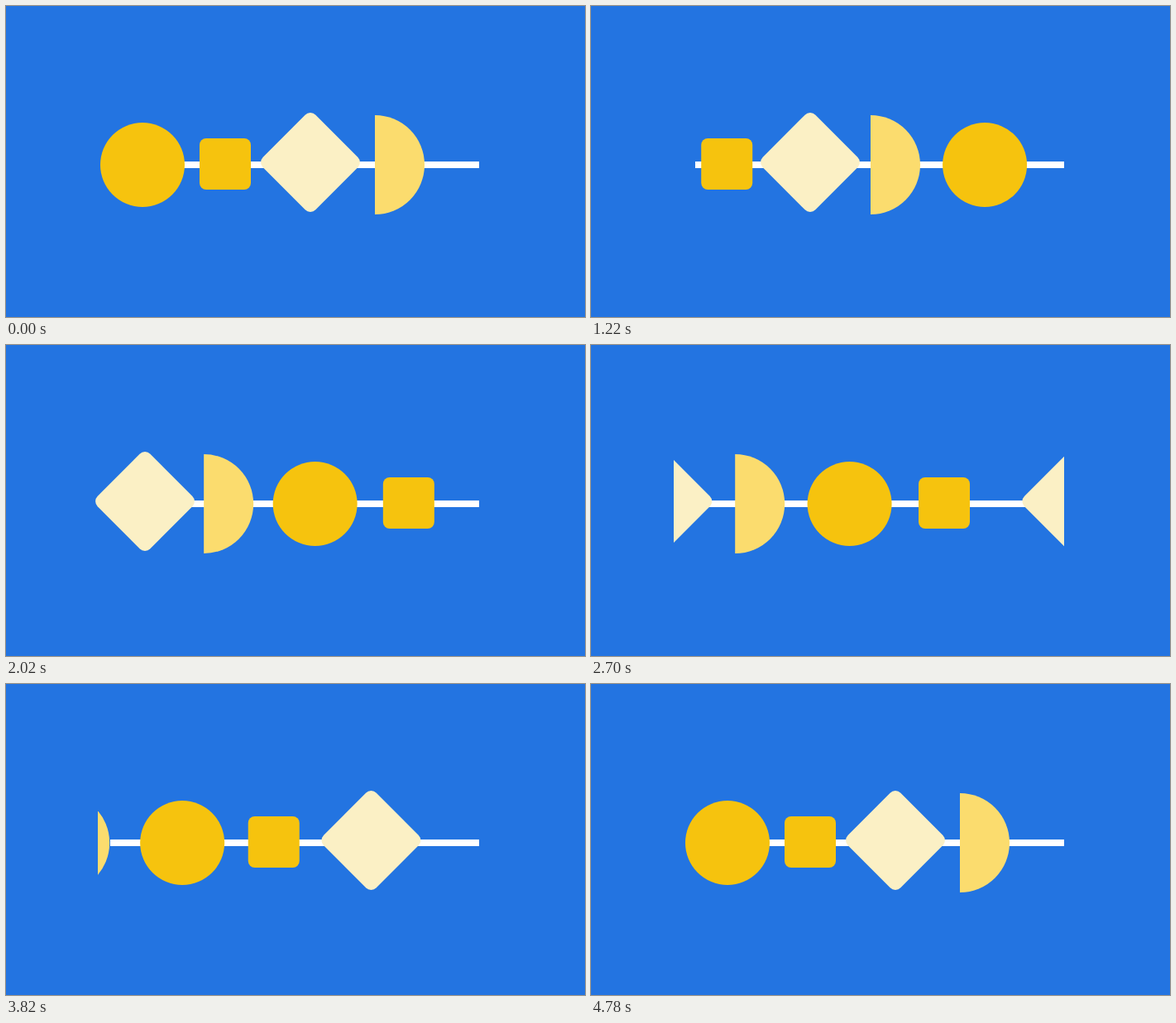
These frames come from a looping animation (700x376 px, 4.8 s). An HTML page:

```html
<!DOCTYPE html>
<html lang="en">
<head>
<meta charset="utf-8">
<title>Shapes on a line</title>
<style>
  html, body { margin: 0; width: 100%; height: 100%; overflow: hidden; background: #2374e1; }
  svg { display: block; width: 100vw; height: 100vh; }
</style>
</head>
<body>
<svg viewBox="0 0 700 376">
  <defs>
    <clipPath id="track"><rect x="111" y="100" width="461" height="180"/></clipPath>
    <clipPath id="wide"><rect id="wideBox" x="95" y="100" width="477" height="180"/></clipPath>
    <circle id="s0" cy="192" r="51" fill="#f6c30e"/>
    <rect id="s1" x="-31" y="160" width="62" height="62" rx="8" fill="#f6c30e"/>
    <rect id="s2" x="-45" y="-45" width="90" height="90" rx="9" fill="#fbf0c5" transform="translate(0 189) rotate(45)"/>
    <path id="s3" d="M-30 132a60 60 0 0 1 0 120z" fill="#fbdc6e"/>
  </defs>
  <rect width="700" height="376" fill="#2374e1"/>
  <rect x="126" y="188" width="446" height="8" fill="#fff"/>
  <g id="shapes"></g>
</svg>
<script>
const LOOP = 4800, MOVE = 1060, STAGGER = 40;
const STARTS = [40, 1200, 2390, 3560];
const SLOTS = [47, 165, 265, 368, 476, 638];
const DIAMOND = 2;
const NS = "http://www.w3.org/2000/svg";
const wideBox = document.getElementById("wideBox");
const root = document.getElementById("shapes");

function make(name, attrs, parent) {
  const el = document.createElementNS(NS, name);
  for (const key in attrs) el.setAttribute(key, attrs[key]);
  return parent.appendChild(el);
}

const bez = (s, a, b) => 3 * (1 - s) * (1 - s) * s * a + 3 * (1 - s) * s * s * b + s * s * s;

function ease(x) {
  if (x <= 0) return 0;
  if (x >= 1) return 1;
  let lo = 0, hi = 1;
  for (let n = 0; n < 30; n++) {
    const mid = (lo + hi) / 2;
    if (bez(mid, 0.15, 0.05) < x) lo = mid; else hi = mid;
  }
  return bez(lo, 0, 1);
}

// progress of the shape standing in slot k during one step
const progress = (t, step, k) => ease((t - STARTS[step] - STAGGER * k) / MOVE);
const shift = (t, step, k) => progress(t, step, k) * (SLOTS[k + 1] - SLOTS[k]);

// each shape has a copy that leaves on the left and one that enters on the right
const shapes = [0, 1, 2, 3].map(i => {
  const clip = `url(#${i === DIAMOND ? "wide" : "track"})`;
  const add = () => make("use", { href: "#s" + i }, make("g", { "clip-path": clip }, root));
  return { out: add(), back: add() };
});

const place = (el, x) => el.setAttribute("transform", `translate(${x.toFixed(2)} 0)`);

function draw(t) {
  shapes.forEach(({ out, back }, i) => {
    let xOut = SLOTS[i + 1], xBack = SLOTS[5];
    for (let step = 0; step < 4; step++) {
      if (step <= i) xOut -= shift(t, step, i - step);
      if (step >= i) xBack -= shift(t, step, i - step + 4);
    }
    place(out, xOut);
    place(back, xBack);
    out.setAttribute("visibility", progress(t, i, 0) < 1 ? "visible" : "hidden");
  });
  const left = 95 + 11 * progress(t, DIAMOND, 0) ** 2;
  wideBox.setAttribute("x", left);
  wideBox.setAttribute("width", 572 - left);
}

const begin = performance.now();
function tick() {
  draw((performance.now() - begin) % LOOP);
  requestAnimationFrame(tick);
}
draw(0);
requestAnimationFrame(tick);
</script>
</body>
</html>
```
